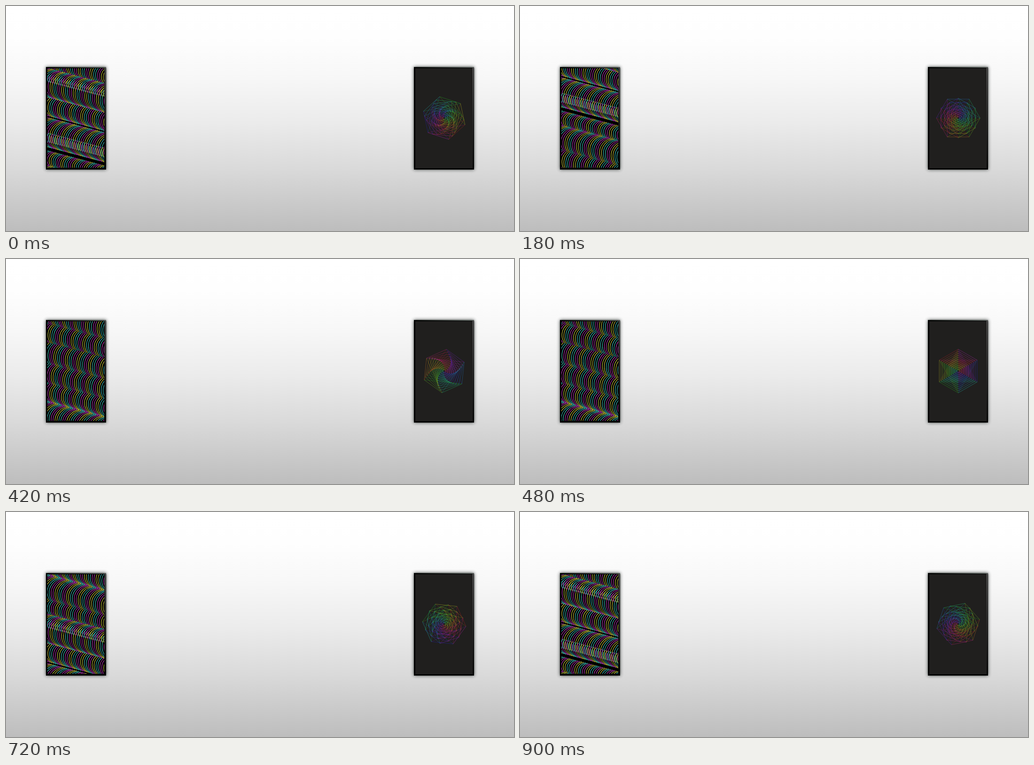
Animation of 1081 by 480 pixels, one loop 0.96 s. Source, as an HTML page with a canvas:

```html
<!DOCTYPE html>
<html lang="en">
<head>
<meta charset="utf-8">
<title>Two framed screens</title>
<style>
  html, body { margin: 0; width: 100%; height: 100%; overflow: hidden; }
  body { background: linear-gradient(#fff 0%, #fefefe 14%, #f7f7f7 32%, #ebebeb 52%, #dadada 72%, #bdbdbd 100%); }
  canvas { display: block; }
</style>
</head>
<body>
<canvas id="stage" width="1081" height="480"></canvas>
<script>
const ctx = document.getElementById('stage').getContext('2d');
const LOOP = 960, STEP = 60, RAD = Math.PI / 180;
const SLOPE = 0.265, PERIOD = 511, LEFT = 88;
const INKS = ['#3fc4be', '#b93ab4', '#c9c83e'];

// Bands of arcs: top, bottom, open ends (1 = top, 2 = bottom)
const BANDS = [
  [132, 195, 3], [144, 162, 0], [195, 234, 2], [237, 301, 3], [270, 290, 0],
  [308, 339, 1], [339, 393, 1], [393, 433, 0], [433, 479, 0], [479, 521, 0],
  [521, 560, 2], [560, 613, 1], [613, 643, 0]
];

const tilt = a => Math.sin(a) + SLOPE * Math.cos(a);

function drawBand([top, bottom, ends], shift, row) {
  const up = (ends & 1 ? 84 : 50) * RAD;
  const down = (ends & 2 ? 62 : 38) * RAD;
  const r = (bottom - top) / (tilt(down) - tilt(-up));
  const y = top + shift - r * tilt(-up);
  for (let i = 0; i < 48; i++) {
    const dx = i * 4.1 - 28;
    ctx.strokeStyle = INKS[Math.floor(i / 2 + row) % 3];
    ctx.beginPath();
    ctx.arc(LEFT + dx, y + SLOPE * dx, r, Math.PI + up, Math.PI - down, true);
    ctx.stroke();
  }
}

function drawTubes(t) {
  const scroll = Math.floor((t + 75) / 150) % 6 * PERIOD / 6;
  ctx.save();
  ctx.beginPath();
  ctx.rect(88, 133, 121, 212);
  ctx.clip();
  ctx.lineWidth = 1.1;
  for (let tile = -1; tile < 2; tile++) {
    const shift = tile * PERIOD - scroll;
    BANDS.forEach((band, row) => {
      if (band[1] + shift > 80 && band[0] + shift < 350) drawBand(band, shift, row);
    });
  }
  ctx.restore();
}

function drawRosette(t) {
  const turn = (480 - t) * 0.1;
  const wheel = 120 + (t - 180) * 0.4;
  const layers = 11;
  ctx.save();
  ctx.translate(932.5, 239);
  ctx.lineWidth = 0.65;
  for (let n = 0; n < layers; n++) {
    const r = 46.5 * (1 - n / layers);
    const spin = -90 + turn * (n + 1);
    const point = k => {
      const a = (spin + k * 60) * RAD;
      return [r * Math.cos(a), r * Math.sin(a)];
    };
    const line = (from, to, alpha) => {
      const angle = spin + (from + to) * 30;
      ctx.strokeStyle = `hsla(${wheel - angle + n * 12}, 80%, 52%, ${alpha})`;
      ctx.beginPath();
      ctx.moveTo(...point(from));
      ctx.lineTo(...point(to));
      ctx.stroke();
    };
    for (let k = 0; k < 6; k++) {
      line(k, k + 1, 0.5);
      line(k, k + 2, 0.32);
    }
  }
  ctx.restore();
}

function drawFrame(x, fill) {
  const y = 130, w = 128, h = 219;
  ctx.save();
  ctx.shadowColor = 'rgba(30,38,34,.85)';
  ctx.shadowBlur = 7;
  ctx.fillStyle = '#000';
  ctx.fillRect(x, y, w, h);
  ctx.restore();
  ctx.fillStyle = fill;
  ctx.fillRect(x + 3, y + 3, w - 6, h - 6);
  const topEdge = ctx.createLinearGradient(x, 0, x + w, 0);
  topEdge.addColorStop(0, '#080a09');
  topEdge.addColorStop(1, '#5e6561');
  ctx.fillStyle = topEdge;
  ctx.fillRect(x, y, w, 2);
  const sideEdge = ctx.createLinearGradient(0, y, 0, y + h);
  sideEdge.addColorStop(0, '#626262');
  sideEdge.addColorStop(0.5, '#2c2c2c');
  sideEdge.addColorStop(1, '#050505');
  ctx.fillStyle = sideEdge;
  ctx.fillRect(x + w - 3, y, 2, h);
}

function draw(t) {
  ctx.clearRect(0, 0, 1081, 480);
  drawFrame(85, '#000');
  drawTubes(t);
  drawFrame(868, '#201f1e');
  drawRosette(t);
}

const start = performance.now();
function tick() {
  const t = (performance.now() - start) % LOOP;
  draw(Math.floor(t / STEP) * STEP);
  requestAnimationFrame(tick);
}
tick();
</script>
</body>
</html>
```
